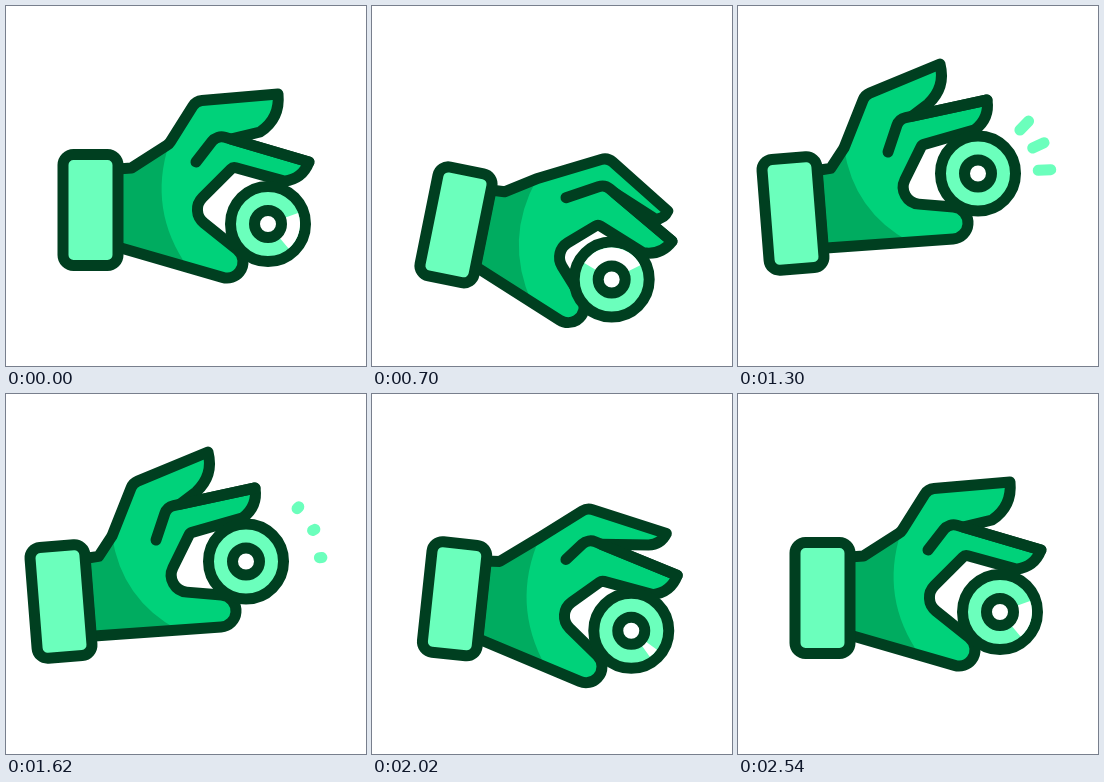
An HTML page with a canvas that plays this animation: 360 by 360 pixels, repeating every 2690 ms.

```html
<!DOCTYPE html>
<html lang="en">
<head>
<meta charset="utf-8">
<title>Hand with coin</title>
<style>
html, body { margin: 0; width: 100%; height: 100%; overflow: hidden; background: #fff; }
canvas { display: block; width: 360px; height: 360px; }
</style>
</head>
<body>
<canvas id="stage"></canvas>
<script>
const LOOP = 2690, STEP = 20, LINE = 11, THUMB = 16;
const INK = '#003f20', PALM = '#00ac60', SKIN = '#00d27a', MINT = '#6bffbc', WHITE = '#fff';

// cuff x, y, degrees | coin | heel | knuckle | index tip, end | middle tip, base | gap | thumb | crease top, end
const rest = [84.5, 204, 0, 262, 218, 163, 138, 190, 95, 272, 88, 254, 126,
  303, 156, 227, 161, 183, 205, 221, 256, 211, 129, 190, 156];
const low = [84, 219, 11.5, 239.5, 274, 165, 173, 236, 152, 296, 206, 284, 214,
  300, 236, 226, 219, 181, 246, 196, 301, 233, 179, 194, 192];
const rising = [68, 212, 2.5, 245.5, 214, 137, 152, 174, 109, 249, 115, 238, 139,
  278, 154, 207, 171, 168, 210, 211, 255, 189, 138, 171, 166];
const raised = [55, 207.5, -4.5, 240, 167.5, 106, 142, 127, 89, 202, 58, 190, 98,
  249, 94, 184, 139, 156, 196, 214, 217, 161, 113, 150, 146];
const sinking = [65, 206, -1, 250, 191, 130, 139, 156, 93, 236, 83, 220, 112,
  273, 125, 203, 157, 163, 205, 217, 238, 182, 121, 166, 155];
const settling = [84, 204.5, 4.5, 260.5, 233, 168, 142, 210, 109, 290, 126, 272, 145,
  306, 176, 230, 180, 184, 216, 216, 269, 216, 141, 194, 163];
const dip = rest.map((v, i) => v + (settling[i] - v) * 1.46);

const key = (time, values, passing = false) => ({ time, values, passing });
const motion = [key(0, rest), key(740, low), key(1040, rising, true), key(1300, raised),
  key(1680, raised), key(1840, sinking, true), key(2060, dip), key(2240, settling, true),
  key(2540, rest), key(LOOP, rest)];
// start and end angle of the coin's white glint
const glint = [key(0, [-20, 50]), key(740, [-150, -27]), key(1000, [-90, -90]),
  key(1900, [50, 50]), key(2240, [3, 66]), key(2540, [-20, 50]), key(LOOP, [-20, 50])];

const canvas = document.getElementById('stage');
const ctx = canvas.getContext('2d');
const ratio = window.devicePixelRatio || 1;
canvas.width = canvas.height = 360 * ratio;

const mix = (a, b, f) => a + (b - a) * f;
const along = (a, b, f) => [mix(a[0], b[0], f), mix(a[1], b[1], f)];
const rad = deg => deg * Math.PI / 180;
const smooth = (t, from, to) => {
  const f = Math.min(1, Math.max(0, (t - from) / (to - from)));
  return f * f * (3 - 2 * f);
};

// Hermite curve that rests at every key not marked as passing
function sample(keys, t) {
  const n = Math.max(0, keys.findIndex(k => k.time > t) - 1);
  const a = keys[n], b = keys[n + 1], span = b.time - a.time;
  const f = (t - a.time) / span, s = f * f * (3 - 2 * f);
  const slope = (i, c) => keys[i].passing
    ? (keys[i + 1].values[c] - keys[i - 1].values[c]) / (keys[i + 1].time - keys[i - 1].time) : 0;
  return a.values.map((v, c) => mix(v, b.values[c], s)
    + span * f * (1 - f) * ((1 - f) * slope(n, c) - f * slope(n + 1, c)));
}

function bulge(a, b, amount) {
  const [x, y] = along(a, b, 0.5);
  return [x + (b[1] - a[1]) * amount, y - (b[0] - a[0]) * amount];
}

// Angle at which a line from p touches the thumb circle
function touch(p, centre, side) {
  const dx = p[0] - centre[0], dy = p[1] - centre[1];
  return Math.atan2(dy, dx) + side * Math.acos(Math.min(1, THUMB / Math.hypot(dx, dy)));
}
const onThumb = (c, a) => [c[0] + THUMB * Math.cos(a), c[1] + THUMB * Math.sin(a)];

function paint(fill, stroke) {
  if (fill) { ctx.fillStyle = fill; ctx.fill(); }
  if (stroke) { ctx.strokeStyle = stroke; ctx.stroke(); }
}

function drawHand(pose) {
  const [heel, knuckle, indexTip, indexEnd, midTip, midBase, gap, thumb, crease, creaseEnd] =
    Array.from({ length: 10 }, (_, i) => [pose[5 + 2 * i], pose[6 + 2 * i]]);
  const cos = Math.cos(rad(pose[2])), sin = Math.sin(rad(pose[2]));
  const fromCuff = (x, y) => [pose[0] + x * cos - y * sin, pose[1] + x * sin + y * cos];
  const wristTop = fromCuff(27, -41), wristBend = fromCuff(41, -42), wristLow = fromCuff(27, 37);

  const dx = midTip[0] - midBase[0], dy = midTip[1] - midBase[1], reach = Math.hypot(dx, dy);
  const midEnd = [midBase[0] + dx * 0.66 - dy / reach * 17.5, midBase[1] + dy * 0.66 + dx / reach * 17.5];
  const top = touch(gap, thumb, 1), bottom = touch(wristLow, thumb, -1);

  const hand = () => {
    ctx.beginPath();
    ctx.moveTo(...wristTop);
    ctx.lineTo(...wristBend);
    ctx.arcTo(...heel, ...knuckle, 12);
    ctx.arcTo(...knuckle, ...indexTip, 12);
    ctx.lineTo(...indexTip);
    ctx.quadraticCurveTo(...bulge(indexTip, indexEnd, 0.3), ...indexEnd);
    ctx.lineTo(...along(crease, midTip, 0.15));
    ctx.lineTo(...midTip);
    ctx.quadraticCurveTo(...bulge(midTip, midEnd, 0.3), ...midEnd);
    ctx.arcTo(...midBase, ...gap, 5);
    ctx.arcTo(...gap, ...onThumb(thumb, top), 17);
    ctx.arc(...thumb, THUMB, top, bottom + (bottom < top ? 2 * Math.PI : 0));
    ctx.lineTo(...wristLow);
    ctx.closePath();
  };
  hand();
  paint(SKIN);

  const shadeEnd = along(wristLow, onThumb(thumb, bottom), 0.67);
  ctx.beginPath();
  ctx.moveTo(...wristTop);
  ctx.lineTo(...wristBend);
  ctx.lineTo(...heel);
  ctx.quadraticCurveTo(...bulge(shadeEnd, heel, 0.25), ...shadeEnd);
  ctx.lineTo(...wristLow);
  paint(PALM);

  hand();
  paint(null, INK);
  ctx.beginPath();
  ctx.moveTo(...creaseEnd);
  ctx.arcTo(...crease, ...midTip, 12);
  ctx.lineTo(...midTip);
  paint(null, INK);

  ctx.save();
  ctx.translate(pose[0], pose[1]);
  ctx.rotate(rad(pose[2]));
  ctx.beginPath();
  ctx.roundRect(-27.5, -55.5, 55, 111, 10.5);
  paint(MINT, INK);
  ctx.restore();
}

function drawCoin(x, y, [start, end]) {
  const ring = (r, fill) => {
    ctx.beginPath();
    ctx.arc(x, y, r, 0, 2 * Math.PI);
    paint(fill, INK);
  };
  ring(37.5, MINT);
  if (end - start > 1) {
    ctx.beginPath();
    ctx.arc(x, y, 32, rad(start), rad(end));
    ctx.arc(x, y, 15, rad(end), rad(start), true);
    paint(WHITE);
  }
  ring(13.5, WHITE);
}

function drawSparks(x, y, t) {
  const head = mix(60, 76, smooth(t, 1200, 1340));
  const tail = mix(60, 76, smooth(t, 1260, 1740));
  if (head - tail < 0.5) return;
  for (const angle of [-46, -25, -3].map(rad)) {
    const c = Math.cos(angle), s = Math.sin(angle);
    ctx.beginPath();
    ctx.moveTo(x + tail * c, y + tail * s);
    ctx.lineTo(x + head * c, y + head * s);
    paint(null, MINT);
  }
}

function draw(t) {
  ctx.setTransform(ratio, 0, 0, ratio, 0, 0);
  ctx.fillStyle = WHITE;
  ctx.fillRect(0, 0, 360, 360);
  ctx.lineWidth = LINE;
  ctx.lineCap = ctx.lineJoin = 'round';
  const pose = sample(motion, t);
  drawHand(pose);
  drawCoin(pose[3], pose[4], sample(glint, t));
  drawSparks(pose[3], pose[4], t);
}

const begin = performance.now();
function tick() {
  const t = (performance.now() - begin) % LOOP;
  draw(t - t % STEP);
  requestAnimationFrame(tick);
}
tick();
</script>
</body>
</html>
```
